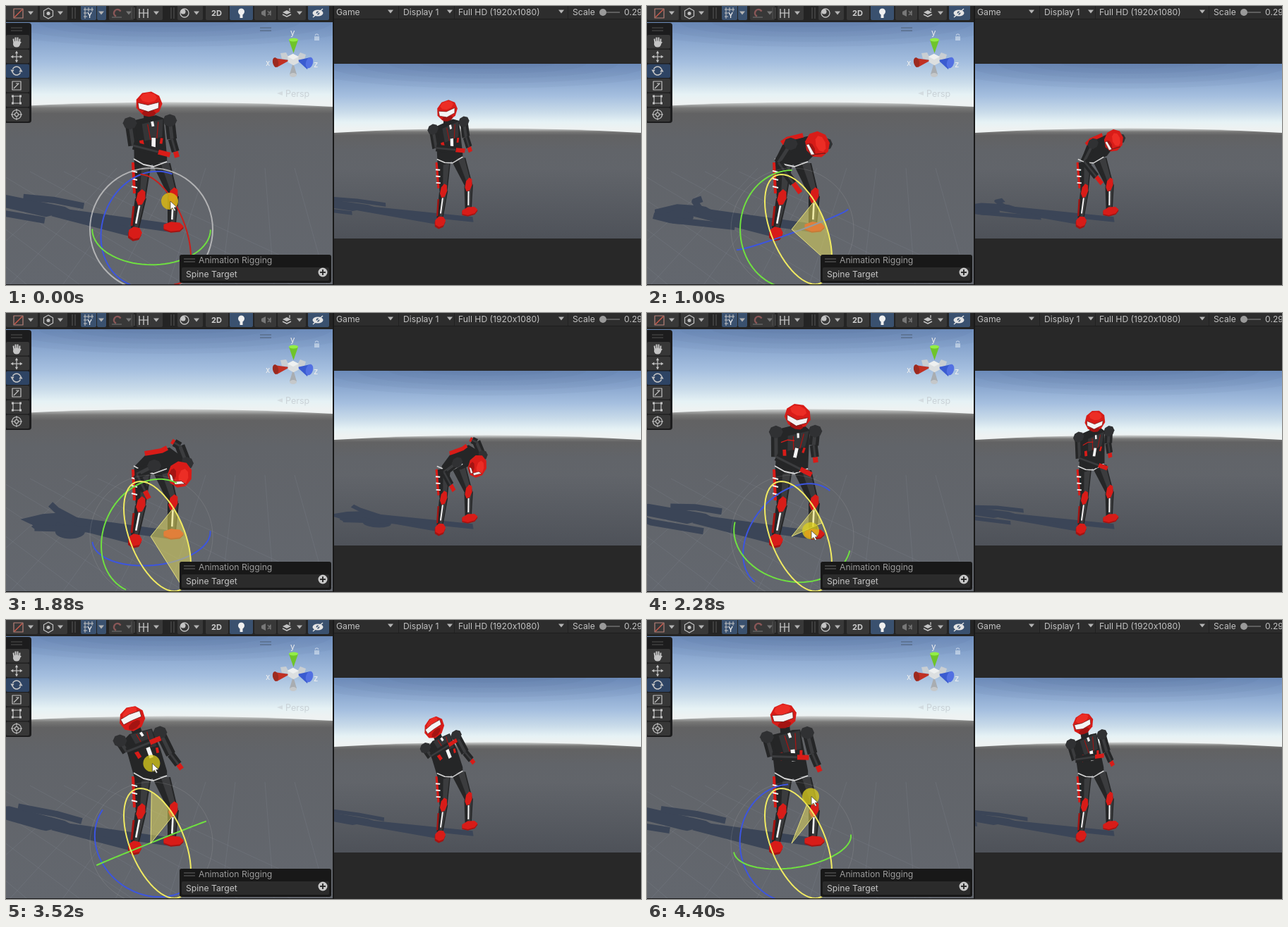
These frames come from a looping animation (900 by 396 pixels, 4.48 s). An HTML page with a canvas:

```html
<!DOCTYPE html>
<html lang="en">
<head>
<meta charset="utf-8">
<title>Spine rotation</title>
<style>
html, body { margin: 0; width: 100%; height: 100%; overflow: hidden; background: #191919; }
canvas { display: block; }
</style>
</head>
<body>
<canvas id="stage" width="900" height="396"></canvas>
<script>
const ctx = document.getElementById('stage').getContext('2d');
const LOOP = 4480, STEP = 200 / 3, RAD = Math.PI / 180;
const { sin, cos, PI } = Math;
const RED = '#d81c18', DEEP = '#a41412', BLACK = '#252627', GREY = '#3b3c3e', WHITE = '#f4f4f4', INK = '#c4c4c4';

// Turning points of the drag: time in ms, bend in degrees
const DRAG = [[0, 0], [100, 0], [850, 92], [1420, -34], [1920, 105], [2520, -37],
  [3000, 109], [3520, -39], [3940, 108], [4400, -14], [LOOP, -14]];

function bendAt(t) {
  const i = DRAG.findIndex((k, n) => n && t <= k[0]);
  const [t0, b0] = DRAG[i - 1], [t1, b1] = DRAG[i];
  return b0 + (b1 - b0) * (1 - cos(PI * (t - t0) / (t1 - t0))) / 2;
}

// ---- drawing helpers ----

const range = (n, f) => Array.from({ length: n }, (_, i) => f(i));

function trace(pts, close) {
  ctx.beginPath();
  for (const p of pts) ctx.lineTo(p[0], p[1]);
  if (close) ctx.closePath();
}
function poly(fill, ...coords) {
  const n = coords.flat(Infinity);
  trace(range(n.length / 2, i => [n[2 * i], n[2 * i + 1]]), true);
  ctx.fillStyle = fill;
  ctx.fill();
}
function line(color, width, ...pts) {
  trace(pts);
  ctx.strokeStyle = color;
  ctx.lineWidth = width;
  ctx.stroke();
}
function rect(fill, x, y, w, h, r = 0) {
  ctx.beginPath();
  ctx.roundRect(x, y, w, h, r);
  ctx.fillStyle = fill;
  ctx.fill();
}
function frame(color, x, y, w, h) {
  ctx.strokeStyle = color;
  ctx.lineWidth = 1.2;
  ctx.strokeRect(x, y, w, h);
}
function oval(fill, x, y, rx, ry = rx, turn = 0) {
  ctx.beginPath();
  ctx.ellipse(x, y, rx, ry, turn, 0, 7);
  ctx.fillStyle = fill;
  ctx.fill();
}
function ring(x, y, r, color, width = 1.3, from = 0, to = 7) {
  ctx.beginPath();
  ctx.arc(x, y, r, from, to);
  ctx.strokeStyle = color;
  ctx.lineWidth = width;
  ctx.stroke();
}
function blob(fill, [x, y], rx, ry, turn = 0, sides = 8) {
  poly(fill, range(sides, i => {
    const u = rx * cos(i * 2 * PI / sides), v = ry * sin(i * 2 * PI / sides);
    return [x + u * cos(turn) - v * sin(turn), y + u * sin(turn) + v * cos(turn)];
  }));
}
function label(s, x, y, color = '#c2c2c2', size = 12.2, weight = 400) {
  ctx.font = `${weight} ${size}px Inter, sans-serif`;
  ctx.fillStyle = color;
  ctx.fillText(s, x, y);
}
function caret(x, y, color = '#b4b4b4') {
  poly(color, x - 4, y - 2.5, x + 4, y - 2.5, x, y + 2.5);
}
function fade(y0, y1, ...colors) {
  const g = ctx.createLinearGradient(0, y0, 0, y1);
  for (const [p, c] of colors) g.addColorStop(p, c);
  return g;
}
function clipTo(x, y, w, h) {
  ctx.save();
  ctx.beginPath();
  ctx.rect(x, y, w, h);
  ctx.clip();
}
function between(a, b, k) {
  return [a[0] + (b[0] - a[0]) * k, a[1] + (b[1] - a[1]) * k];
}
function hull(pts) {
  const half = list => {
    const out = [];
    for (const p of list) {
      while (out.length > 1) {
        const [a, b] = out.slice(-2);
        if ((b[0] - a[0]) * (p[1] - a[1]) > (b[1] - a[1]) * (p[0] - a[0])) break;
        out.pop();
      }
      out.push(p);
    }
    return out;
  };
  const sorted = [...pts].sort((a, b) => a[0] - b[0] || a[1] - b[1]);
  return [...half(sorted), ...half(sorted.reverse())];
}

// ---- surroundings ----

function world(x, y, w, horizon, bottom) {
  rect(fade(y, horizon, [0, '#7191c1'], [.5, '#a5bfdf'], [.75, '#cadcea'], [.9, '#e6f2f5'], [1, '#eef2f2']),
    x, y, w, horizon - y + 10);
  for (let i = 1; i < 6; i++) oval('rgba(70,85,120,.06)', x + w / 2, y, 50 + 45 * i, 7 * i);
  ctx.beginPath();
  ctx.moveTo(x, horizon + 6);
  ctx.quadraticCurveTo(x + w / 2, horizon - 7, x + w, horizon + 6);
  ctx.lineTo(x + w, bottom);
  ctx.lineTo(x, bottom);
  ctx.fillStyle = fade(horizon, bottom, [0, '#c9cccb'], [.03, '#777776'], [.06, '#626263'], [.2, '#616469'], [1, '#63676e']);
  ctx.fill();
}

function floorGrid() {
  const c = 'rgba(165,172,182,.13)';
  for (let i = 0; i < 8; i++) {
    line(c, 1, [-70 + i * 75, 396], [115 + i * 42, 230]);
    line(c, 1, [480 - i * 75, 396], [130 - i * 48, 235]);
  }
}

// ---- character: points are (right, up, front) from the hips ----

const JOINTS = {
  neck: [0, 20, 0], head: [0, 45, 3],
  shoulderR: [28, 20, -6], elbowR: [39, -6, 17], handR: [9, -15, 66],
  shoulderL: [-32, 14, 6], elbowL: [-41, -18, -5], handL: [-45, -45, 0]
};
const onScreen = ([r, u, f]) => [205 - .83 * r + .55 * f, 219 - .93 * u + .2 * r + .3 * f];
const onFloor = ([r, u, f]) => {
  const h = u + 110;
  return [206 - .83 * r + .55 * f - 1.27 * h, 320 + .2 * r + .3 * f - .26 * h];
};
const corners = (r, low, high, f) => range(8, i => [i & 1 ? r : -r, i & 2 ? high : low, i & 4 ? f : -f]);

// Each spine segment takes a growing share of the bend; returns chest to hip space
function chestSpace(b) {
  let up = 0, front = 0;
  for (const share of [.4, .8]) {
    up += 20 * cos((b * share - 5) * RAD);
    front += 20 * sin((b * share - 5) * RAD);
  }
  const c = cos((b - 5) * RAD), s = sin((b - 5) * RAD);
  return (r, u, f) => [r, up + u * c - f * s, front + u * s + f * c];
}
function pose(b, map) {
  const chest = chestSpace(b), at = (...p) => map(chest(...p)), joint = {};
  for (const name in JOINTS) joint[name] = at(...JOINTS[name]);
  const torso = hull([...corners(19, -12, 21, 10).map(p => at(...p)), ...corners(22, -3, 3, 9).map(map)]);
  return { at, joint, torso };
}

function castShadow(b) {
  const { joint: j, torso } = pose(b, onFloor), c = '#3b4557';
  const hip = onFloor([0, 0, 0]);
  line(c, 14, [180, 321], hip);
  line(c, 12, [234, 315], hip);
  poly(c, torso);
  line(c, 12, j.neck, j.head);
  oval(c, ...j.head, 21, 10);
  line(c, 9, j.shoulderR, j.elbowR, j.handR);
  line(c, 9, j.shoulderL, j.elbowL, j.handL);
}

function limb(a, b, wa, wb) {
  const quad = k => [[a[0] - wa * k, a[1]], [a[0] + wa, a[1]], [b[0] + wb, b[1]], [b[0] - wb * k, b[1]]];
  poly(BLACK, quad(1));
  poly(GREY, quad(-.1).map(([x, y]) => [x - 2, y]));
}
function leg(hip, knee, ankle) {
  limb(hip, knee, 13, 7);
  limb(knee, ankle, 8, 6);
  line(WHITE, 2.6, between(knee, ankle, .25), between(knee, ankle, .85));
  blob(RED, between(knee, ankle, -.03), 6.5, 12, .25, 7);
}
function legs() {
  leg([220, 223], [237, 270], [235, 309]);
  blob(DEEP, [237, 315], 15, 7, 0, 7);
  blob(RED, [237, 313], 15, 7, 0, 7);
  leg([193, 223], [191, 273], [183, 315]);
  line(RED, 4, [180, 222], [182, 266]);
  line(DEEP, 3, [181, 284], [178, 312]);
  for (let i = 0; i < 3; i++) line(WHITE, 2.2, [178, 234 + 11 * i], [186, 236 + 11 * i]);
  blob(DEEP, [182, 325], 10, 9, 0, 7);
  blob(RED, [183, 322], 10, 9, 0, 7);
}

function arm(shoulder, elbow, hand) {
  const wrist = between(elbow, hand, .68);
  line(BLACK, 14, shoulder, elbow);
  line(GREY, 5, shoulder, elbow);
  line(RED, 7, wrist, hand);
  line(BLACK, 11, elbow, wrist);
  line(GREY, 3, elbow, wrist);
  blob('#303133', shoulder, 10, 9);
}

function helmet(b, at) {
  const [r0, u0, f0] = JOINTS.head, yaw = 38 * RAD;
  const face = (r, u, f) => at(r0 + r * cos(yaw) + f * sin(yaw), u0 + u, f0 + f * cos(yaw) - r * sin(yaw));
  const turn = b * RAD;
  blob(RED, face(0, 0, 0), 19, 17.5, turn, 9);
  blob('#ec2d25', face(0, 9, 0), 12, 7, turn);
  blob(DEEP, face(0, -12, 7), 10, 5, turn);
  const visor = [[15, 4, 7], [0, 3, 16], [-15, 4, 7], [-14, -5, 7], [0, -7, 16], [14, -5, 7]].map(p => face(...p));
  poly(WHITE, visor);
  line('#6a1714', .8, ...visor, visor[0]);
}

function figure(b, shift) {
  const { at, joint: j, torso } = pose(b, p => {
    const [x, y] = onScreen(p);
    return [x + shift, y];
  });
  const lean = sin((b - 5) * RAD), facing = cos((b + 20) * RAD);
  legs();
  arm(j.shoulderL, j.elbowL, j.handL);
  poly(BLACK, torso);
  line(BLACK, 14, j.neck, j.head);
  if (facing > 0) {
    poly('#343537', at(-18, 20, 10), at(18, 20, 10), at(15, -6, 10), at(-15, -6, 10));
    for (const r of [-9, 9]) line(DEEP, 1.3, at(r, 18, 11), at(r * .6, -6, 11));
    line(RED, 6 * facing, at(18, -5, 6), at(16, -16, 6));
    line(RED, 4 * facing, at(-15, -8, 9), at(-13, -16, 9));
    line(WHITE, 6 * facing, at(0, -4, 11), at(0, -21, 9));
    line(WHITE, 4 * facing, at(0, 20, 9), at(0, 13, 11));
  }
  if (lean > .1) line(RED, 7 * lean, at(22, -14, -9), at(16, -6, -13), at(0, -4, -13), at(-12, -8, -13));
  line('#d6d6d6', 1.8, [181, 217], [195, 225], [209, 228], [228, 221]);
  arm(j.shoulderR, j.elbowR, j.handR);
  helmet(b, at);
}

// ---- rotation handle: unit axes, x right, y down, z to the viewer ----

const UP = [-.29, -.944, .156], FRONT = [.471, 0, .88], SIDE = [-.831, .329, .445];
const turned = a => UP.map((v, i) => v * cos(a) + FRONT[i] * sin(a));

function halfRing(v, color) {
  const mid = Math.atan2(v[2], SIDE[2]);
  line(color, 2, ...range(41, i => {
    const a = mid + (i / 40 - .5) * PI, c = 84 * cos(a), s = 84 * sin(a);
    return [206 + c * SIDE[0] + s * v[0], 317 + c * SIDE[1] + s * v[1]];
  }));
}
function bendArc(from, to) {
  return range(61, i => {
    const a = (from + (to - from) * i / 60) * RAD;
    return [214.5 - 24 * cos(a) + 41 * sin(a), 317 - 78 * cos(a)];
  });
}
function handles(b, dragging) {
  ring(206, 317, 87, dragging ? 'rgba(190,190,190,.18)' : 'rgba(205,205,205,.75)', dragging ? 1 : 2);
  halfRing(turned((12 + b) * RAD), '#3c55e0');
  halfRing(turned((122 + b - .0027 * b * b) * RAD), '#6fe040');
  if (!dragging) return line('#c8201c', 2, ...bendArc(0, 180));
  const wedge = [[205, 317], ...bendArc(59, 59 + b)];
  poly('rgba(236,226,92,.5)', wedge);
  line('rgba(245,238,130,.85)', 1, wedge[1], wedge[0], wedge[61]);
  line('#f0ea62', 2, ...bendArc(0, 360));
}

function pointer(b, dragging) {
  const x = 232 + Math.min(0, b + 24) * 1.75, y = 277 + 1.9 * b;
  if (y > 407) return;
  oval(dragging ? 'rgba(222,208,30,.75)' : 'rgba(214,180,22,.88)', x, y, 12);
  const tip = [[0, 0], [0, 12], [3, 9.5], [5.5, 14], [7.5, 13], [5.3, 9], [9, 8.6]].map(([u, v]) => [x + 1 + u, y + v]);
  poly('#fff', tip);
  line('#333', .7, ...tip, tip[0]);
}

// ---- editor interface ----

function compass() {
  poly('#c9ced2', 389, 67, 397, 66, 402, 76, 391, 75);
  poly('#c9ced2', 417, 66, 425, 69, 423, 76, 411, 76);
  poly('#c03023', 380, 74, 384, 87, 402, 77);
  oval('#9c2a20', 382, 80, 4, 7, -.2);
  poly('#3a5bd0', 413, 77, 431, 73, 427, 90);
  oval('#5270e2', 430, 80.5, 5, 8, .3);
  poly('#a9adb1', 402, 97, 412, 97, 407, 80);
  oval('#c5c8ca', 407, 98, 5, 3);
  blob('#dcdfe0', [407, 76], 9, 8, PI / 6, 6);
  blob('#eef0f0', [407, 72], 8, 4, 0, 4);
  poly('#6fc42b', 401, 48, 414, 48, 407.5, 67);
  oval('#93ee45', 407.5, 48, 6.5, 2.5);
  label('y', 403, 42, '#eee', 11.5);
  label('x', 368, 85, '#eee', 11.5);
  label('z', 436, 87, '#eee', 11.5);
  rect('rgba(225,235,245,.55)', 437, 43, 7, 6);
  ring(440.5, 42, 2.2, 'rgba(225,235,245,.55)', 1.2, PI, 0);
  label('Persp', 396, 129, 'rgba(195,203,208,.8)', 12.5);
  poly('rgba(205,212,216,.7)', 384, 124, 392, 121, 392, 127);
  grip(360, '#566984');
}
function grip(x, color, y = 31) {
  for (const dy of [0, 4]) line(color, 1.3, [x, y + dy], [x + 16, y + dy]);
}

function toolbar() {
  const dim = '#777', blue = '#3a516f';
  rect('#242424', 0, 0, 463, 23);
  for (const [x, w] of [[0, 45], [48, 39], [146, 35], [185, 37], [243, 36], [283, 32], [352, 31], [385, 40]]) rect('#383838', x, -2, w, 22, 2);
  for (const [x, w] of [[106, 22], [129, 13], [317, 33], [428, 30]]) rect(blue, x, -2, w, 22, 2);
  for (const x of [35, 77, 135, 213, 270, 416]) caret(x, 10);
  caret(174, 10, dim);
  for (const x of [94, 98, 178, 182, 234, 238]) line('#505050', 1.2, [x, 2], [x, 18]);
  frame('#b8827a', 11, 4, 13, 13);
  line('#cc5b4d', 1.5, [12, 16], [23, 5]);
  const cube = range(7, i => [60 + 7.5 * sin(i * PI / 3), 10.5 - 7.5 * cos(i * PI / 3)]);
  line(INK, 1.2, ...cube);
  oval(INK, 60, 10.5, 2.5);
  for (let i = 0; i < 3; i++) {
    line(INK, 1, [110, 5 + i * 5], [124, 5 + i * 5]);
    line(INK, 1, [112 + i * 5, 2], [112 + i * 5, 18]);
    line(INK, 1.4, [189 + i * 6, 4], [189 + i * 6, 17]);
  }
  rect(blue, 115, 8, 9, 10);
  label('Y', 115, 17, '#eee', 10, 600);
  ring(158, 10, 5, '#8a5757', 2.5, 2, 5.8);
  line(dim, 1, [150, 16], [164, 16]);
  line(INK, 1.2, [188, 10], [202, 10]);
  ring(253, 10, 6, INK);
  oval(INK, 251, 8, 3.5);
  label('2D', 291, 14, '#d0d0d0', 11, 700);
  oval('#f0f0f0', 333.5, 8, 4.5);
  rect('#f0f0f0', 331.5, 12, 4, 5);
  poly(dim, 362, 8, 368, 5, 368, 15, 362, 12);
  line(dim, 1.3, [371, 7], [375, 13], [375, 7], [371, 13]);
  blob(INK, [398, 9], 6, 3, 0, 4);
  line(INK, 1.4, [392, 12], [398, 15], [404, 12]);
  line(INK, 1.3, [402, 3], [402, 7]);
  oval('#e4e4e4', 442, 10, 7.5, 4.5);
  oval(blue, 442, 10, 2.4);
  line('#e4e4e4', 1.5, [435, 16], [449, 4]);
}

function palette() {
  rect('#1c1c1d', -5, 24, 41, 142, 4);
  grip(7, '#454545');
  for (let i = 0; i < 6; i++) rect(i === 2 ? '#2e4464' : '#373737', 0, 41 + 20.7 * i, 33, 19.5, 2);
  oval(INK, 15, 54, 5, 4.5);
  for (let i = 0; i < 4; i++) {
    const c = cos(i * PI / 2), s = sin(i * PI / 2);
    line(INK, 2, [11.5 + i * 2.5, 53], [10.5 + i * 3, i % 3 ? 44.5 : 46.5]);
    line(INK, 1.2, [15, 72], [15 + 7 * c, 72 + 7 * s]);
    blob(INK, [15 + 6 * c, 72 + 6 * s], 2.5, 2.5, i * PI / 2, 3);
    line(INK, 1, [15 + 2 * c, 154 + 2 * s], [15 + 8 * c, 154 + 8 * s]);
    rect(INK, 13.5 + 5.5 * (c - s), 131.5 + 5 * (c + s), 3, 3);
  }
  line(INK, 2, [18, 55], [21, 51]);
  for (const a of [0, PI]) {
    ring(15, 92, 6, INK, 1.5, a + .4, a + 2.8);
    blob(INK, [15 - 6 * cos(a), 92], 3, 3, PI / 2 + a, 3);
  }
  frame(INK, 9, 107, 12, 12);
  line(INK, 1.2, [11, 117], [18, 110], [14, 110]);
  frame(INK, 10, 128, 10, 10);
  ring(15, 154, 6.5, INK, 1.2);
  ring(15, 154, 2.5, INK, 1.2);
}

function overlay() {
  rect('#181818', 246, 353, 215, 40, 3);
  grip(252, '#555', 359);
  label('Animation Rigging', 273, 365, '#9b9b9b');
  rect('#2b2b2b', 249, 371, 209, 19, 2);
  label('Spine Target', 255, 385, '#c6c6c6');
  oval('#c8c8c8', 449, 378, 6.5);
  line('#222', 1.8, [445, 378], [453, 378]);
  line('#222', 1.8, [449, 374], [449, 382]);
}

function gameBar() {
  rect('#282828', 465, 0, 435, 396);
  rect('#2d2d2d', 465, 0, 435, 18);
  line('#1d1d1d', 1, [465, 18.5], [900, 18.5]);
  for (const x of [556.5, 635.5, 796.5]) line('#222', 1, [x, 0], [x, 18]);
  label('Game', 468, 13);
  label('Display 1', 563, 13);
  label('Full HD (1920x1080)', 641, 13);
  label('Scale', 803, 13);
  label('0.29', 876, 13);
  for (const x of [545, 629, 787]) caret(x, 8);
  line('#5e5e5e', 2, [846, 9], [870, 9]);
  oval('#9a9a9a', 846, 9, 5);
}

function sceneView(b, dragging) {
  clipTo(0, 23, 463, 372);
  world(0, 23, 463, 137, 396);
  floorGrid();
  castShadow(b);
  figure(b, 0);
  handles(b, dragging);
  compass();
  ctx.restore();
}

function gameView(b) {
  clipTo(465, 82, 435, 248);
  world(465, 82, 435, 174, 330);
  rect(fade(230, 330, [0, 'rgba(30,33,40,0)'], [1, 'rgba(30,33,40,.3)']), 465, 230, 435, 100);
  ctx.save();
  ctx.transform(.944, .013, .224, .624, 370.5, 103.4);
  castShadow(b);
  ctx.restore();
  ctx.transform(.774, -.139, .029, .846, 464.4, 59);
  figure(b, .08 * Math.max(0, b));
  ctx.restore();
}

function draw() {
  const step = Math.floor((performance.now() % LOOP + 13.4) / STEP);
  const b = bendAt(Math.min(step * STEP, LOOP)), dragging = step > 0;
  ctx.lineJoin = 'round';
  rect('#191919', 0, 0, 900, 396);
  sceneView(b, dragging);
  toolbar();
  palette();
  overlay();
  pointer(b, dragging);
  gameBar();
  gameView(b);
  requestAnimationFrame(draw);
}
draw();
</script>
</body>
</html>
```
